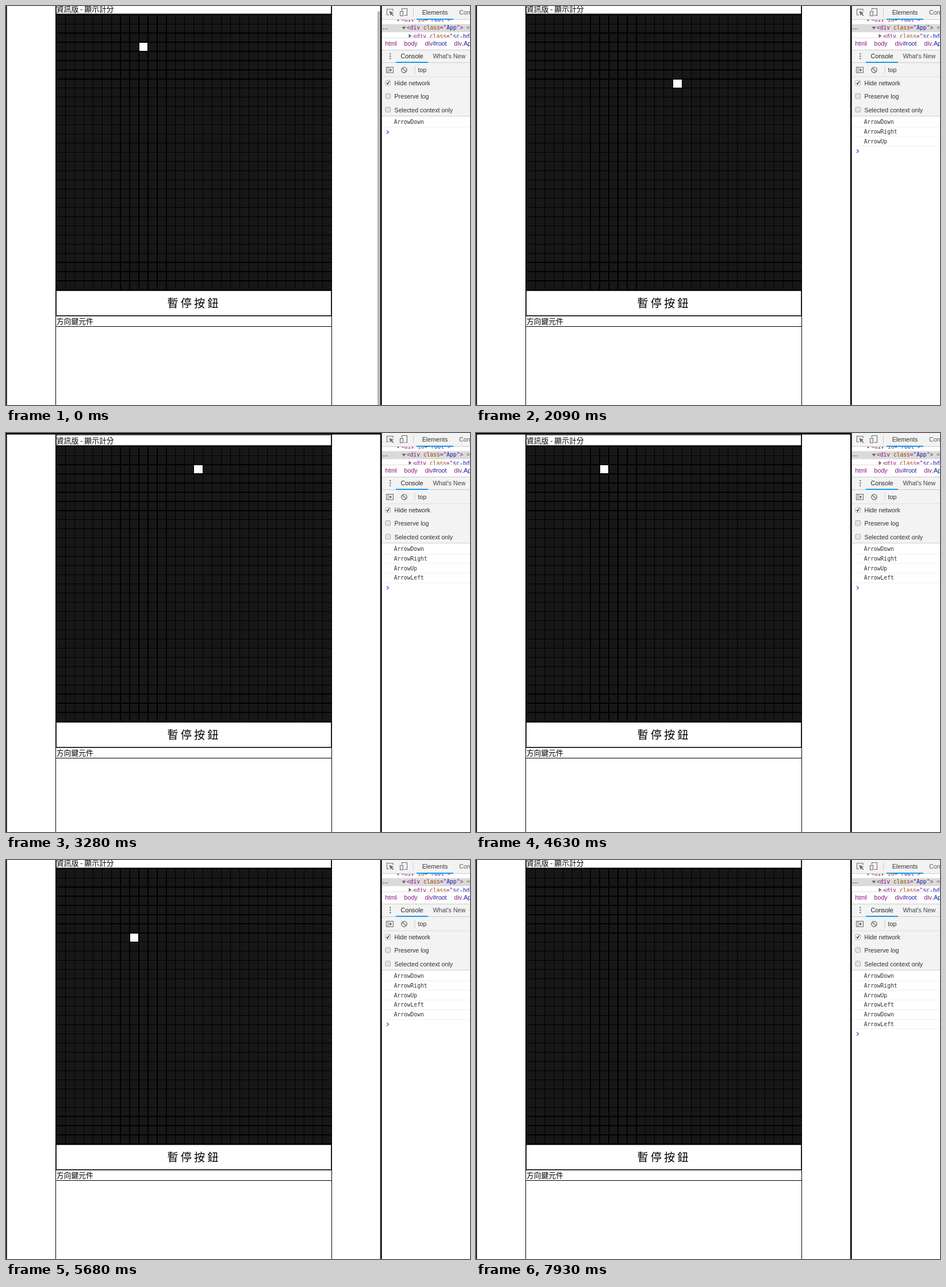
These frames come from a looping animation (807 by 694 pixels, 8 s). An HTML page with a canvas:

```html
<!DOCTYPE html>
<html lang="zh-Hant">
<head>
<meta charset="utf-8">
<title>Grid game with console</title>
<style>
html, body { margin: 0; width: 100%; height: 100%; overflow: hidden; background: #fff; }
canvas { display: block; }
</style>
</head>
<body>
<canvas id="stage" width="807" height="694"></canvas>
<script>
const ctx = document.getElementById('stage').getContext('2d');
const W = 807, H = 694, LOOP = 8000;
const SANS = '10.7px "Liberation Sans", Arial, sans-serif';
const MONO = '9.6px "DejaVu Sans Mono", Menlo, monospace';
const cjk = size => size + 'px "Noto Sans CJK TC", "Noto Sans CJK", sans-serif';
const TAG = '#881280', ATTR = '#994500', VALUE = '#1a1aa6', INK = '#303030', ICON = '#6e6e6e';

// Board: fractional pitch, edges snapped to whole pixels
const CELLS = 30, PITCH = 15.96, CELL = 14.7, LEFT = 88, TOP = 23.8;

// Legs of the walk: dx, dy, number of steps
const START = [9, 3];
const LEGS = [[0, 1, 4], [1, 0, 7], [0, -1, 5], [-1, 0, 8], [0, 1, 7], [-1, 0, 9]];
// Key presses: tick and key
const KEYS = [[0, 'Down'], [5, 'Right'], [14, 'Up'], [21, 'Left'], [33, 'Down'], [41, 'Left']];

function rect(x, y, w, h, color) {
  ctx.fillStyle = color;
  ctx.fillRect(x, y, w, h);
}

function text(str, x, y, font, color) {
  ctx.font = font;
  ctx.fillStyle = color;
  ctx.fillText(str, x, y);
}

// Draws [string, color] runs one after another
function runs(parts, x, y, font) {
  for (const [str, color] of parts) {
    text(str, x, y, font, color);
    x += ctx.measureText(str).width;
  }
}

function poly(points, color, closed, width) {
  ctx.beginPath();
  points.forEach(([x, y]) => ctx.lineTo(x, y));
  if (closed) {
    ctx.closePath();
    ctx.fillStyle = color;
    ctx.fill();
  } else {
    ctx.strokeStyle = color;
    ctx.lineWidth = width;
    ctx.stroke();
  }
}

function outline(x, y, w, h, color, width = 1) {
  ctx.strokeStyle = color;
  ctx.lineWidth = width;
  ctx.strokeRect(x, y, w, h);
}

function clipped(x, y, w, h, draw) {
  ctx.save();
  ctx.beginPath();
  ctx.rect(x, y, w, h);
  ctx.clip();
  draw();
  ctx.restore();
}

function cellAt(col, row, top, color) {
  const x = LEFT + col * PITCH, y = top + row * PITCH;
  const x0 = Math.round(x), y0 = Math.round(y);
  rect(x0, y0, Math.round(x + CELL) - x0, Math.round(y + CELL) - y0, color);
}

function position(steps) {
  let [col, row] = START;
  for (const [dx, dy, count] of LEGS) {
    const n = Math.min(steps, count);
    col += dx * n;
    row += dy * n;
    steps -= n;
  }
  return [col, row];
}

function page(tick) {
  const scroll = tick >= 15 && tick < 33 ? 0 : 8;
  const y = v => v - scroll;

  rect(0, 0, 651, H, '#fff');
  rect(0, 0, 1.6, H, '#000');
  rect(0, y(0), 651, 2.6, '#000');
  rect(86, y(0), 1, H + 8, '#000');
  rect(566, y(0), 1, H + 8, '#000');

  // Thicker sides of the header and button boxes
  rect(87, y(3), 0.8, 544, '#000');
  rect(565.2, y(3), 0.8, 544, '#000');
  rect(86, y(3), 481, 0.8, '#000');
  text('資訊版 - 顯示計分', 87.8, y(17.9), cjk(12.8), '#000');

  rect(86, y(21.4), 481, 482.2, '#000');
  for (let row = 0; row < CELLS; row++)
    for (let col = 0; col < CELLS; col++) cellAt(col, row, y(TOP), '#171717');
  const [col, row] = position(tick - Math.floor(tick / 4));
  if (col >= 0) cellAt(col, row, y(TOP), '#fff');

  ctx.letterSpacing = '4px';
  text('暫停按鈕', 280.6, y(531.8), cjk(19.2), '#000');
  ctx.letterSpacing = '0px';
  rect(86, y(546), 481, 1.6, '#000');
  text('方向鍵元件', 87.8, y(561), cjk(12.8), '#000');
  rect(86, y(565), 481, 1, '#000');

  // Scrollbar fades out after each scroll
  const dark = (tick >= 15 && tick < 19) || (tick >= 33 && tick < 37);
  const light = tick === 0 || tick === 19 || tick === 37;
  if (dark || light) {
    ctx.fillStyle = dark ? '#8c8c8c' : '#b6b6b6';
    ctx.beginPath();
    ctx.roundRect(646, scroll ? 9 : 1, 5.5, H + 10, 2.5);
    ctx.fill();
  }
  rect(651, 0, 2.6, H, '#000');
}

function topBar() {
  rect(654, 0, 153, 23, '#f3f3f3');
  rect(654, 23, 153, 1, '#ccc');

  // Inspect and device icons
  poly([[673, 9], [673, 5.5], [662.5, 5.5], [662.5, 15.5], [666, 15.5]], ICON, false, 1.1);
  poly([[666.5, 8.5], [674.5, 12], [671.4, 13], [674.3, 16.2], [673, 17.4], [670.2, 14.3], [668.8, 17]], ICON, true);
  poly([[688.5, 8], [688.5, 4.5], [697.5, 4.5], [697.5, 16.5], [692.5, 16.5]], ICON, false, 1.1);
  outline(685.5, 9.5, 5, 7.5, ICON, 1.1);
  rect(708, 4, 1, 14, '#ccc');

  text('Elements', 723.7, 14.5, SANS, '#333');
  text('Console', 788, 14.5, SANS, '#5a5a5a');
  rect(714, 22, 64, 2, '#1a9be8');
}

function domTree() {
  const open = [['<div ', TAG]];
  const attr = (name, value) => [[name, ATTR], ['="', TAG], [value, VALUE], ['"', TAG]];
  const down = (x, y) => poly([[x, y], [x + 7, y], [x + 3.5, y + 5]], ICON, true);

  rect(654, 24, 153, 31, '#fff');
  clipped(654, 24, 153, 31, () => {
    down(678.5, 22);
    runs([...open, ...attr('id', 'root'), ['>', TAG]], 687, 27.3, MONO);
    rect(654, 31.5, 153, 14, '#dadada');
    for (let i = 0; i < 3; i++) rect(655.5 + i * 3.4, 39, 1.5, 1.5, '#555');
    down(688.5, 36);
    runs([...open, ...attr('class', 'App'), ['>', TAG], [' == $0', '#777']], 697, 41.4, MONO);
    poly([[700.5, 48.5], [705.5, 52], [700.5, 55.5]], ICON, true);
    runs([...open, ...attr('class', 'sc-bdVaJa')], 708, 55.6, MONO);
  });

  rect(654, 55, 153, 1, '#ddd');
  text('html', 659.5, 69, SANS, TAG);
  text('body', 692.5, 69, SANS, TAG);
  runs([['div', TAG], ['#root', VALUE]], 728.5, 69, SANS);
  runs([['div', TAG], ['.App', VALUE]], 779.3, 69, SANS);
}

function checkbox(y, label, on) {
  ctx.fillStyle = on ? '#fff' : '#e4e4e4';
  ctx.beginPath();
  ctx.roundRect(660, y - 4.5, 8.5, 8.5, 1.5);
  ctx.fill();
  ctx.strokeStyle = '#a0a0a0';
  ctx.lineWidth = 0.9;
  ctx.stroke();
  if (on) poly([[662, y - 0.3], [663.7, y + 2], [666.7, y - 3]], '#333', false, 1.4);
  text(label, 675.5, y + 4, SANS, INK);
}

function consoleBars() {
  rect(654, 76, 153, 116, '#f3f3f3');
  rect(654, 76, 153, 1, '#ccc');
  for (let i = 0; i < 3; i++) {
    ctx.fillStyle = ICON;
    ctx.beginPath();
    ctx.arc(668.3, 83 + i * 4.2, 1.2, 0, 7);
    ctx.fill();
  }
  text('Console', 686.5, 91, SANS, '#222');
  text("What's New", 742.5, 91, SANS, '#444');
  rect(654, 98, 153, 1, '#ccc');
  rect(678, 97, 56, 2, '#1a9be8');

  // Sidebar toggle, clear button, context picker
  outline(661.5, 106.5, 12, 9.5, ICON, 1.1);
  rect(664, 106.5, 1, 9.5, ICON);
  poly([[667, 108.3], [671.5, 111.2], [667, 114.2]], ICON, true);
  ctx.strokeStyle = ICON;
  ctx.lineWidth = 1.4;
  ctx.beginPath();
  ctx.arc(692.5, 111.3, 4.7, 0, 7);
  ctx.stroke();
  poly([[689.3, 108], [695.8, 114.6]], ICON, false, 1.4);
  rect(710.5, 104, 1, 14, '#ccc');
  text('top', 716.5, 115, SANS, INK);
  rect(654, 122.5, 153, 1, '#ddd');

  checkbox(134, 'Hide network', true);
  checkbox(157, 'Preserve log', false);
  checkbox(180.5, 'Selected context only', false);
  rect(654, 191, 153, 1, '#d0d0d0');
}

function log(tick) {
  const keys = KEYS.filter(([at]) => tick >= at);
  const row = 16.75;
  rect(654, 192, 153, H - 192, '#fff');
  keys.forEach(([, key], i) => {
    text('Arrow' + key, 674.7, 205 + i * row, MONO, INK);
    rect(654, Math.round(209.5 + i * row), 153, 1, '#f0f0f0');
  });
  const y = 219.4 + (keys.length - 1) * 16.6;
  poly([[662.2, y - 3], [665.4, y], [662.2, y + 3]], '#3a7fe0', false, 1.5);
}

function draw(t) {
  const lag = t < 1640 ? 0 : t < 2830 ? 10 : 20;
  const tick = Math.floor((t + lag) / 150);
  rect(0, 0, W, H, '#fff');
  page(tick);
  topBar();
  domTree();
  consoleBars();
  log(tick);
}

let begin = null;
function frame(now) {
  if (begin === null) begin = now;
  draw((now - begin) % LOOP);
  requestAnimationFrame(frame);
}
draw(0);
requestAnimationFrame(frame);
</script>
</body>
</html>
```
